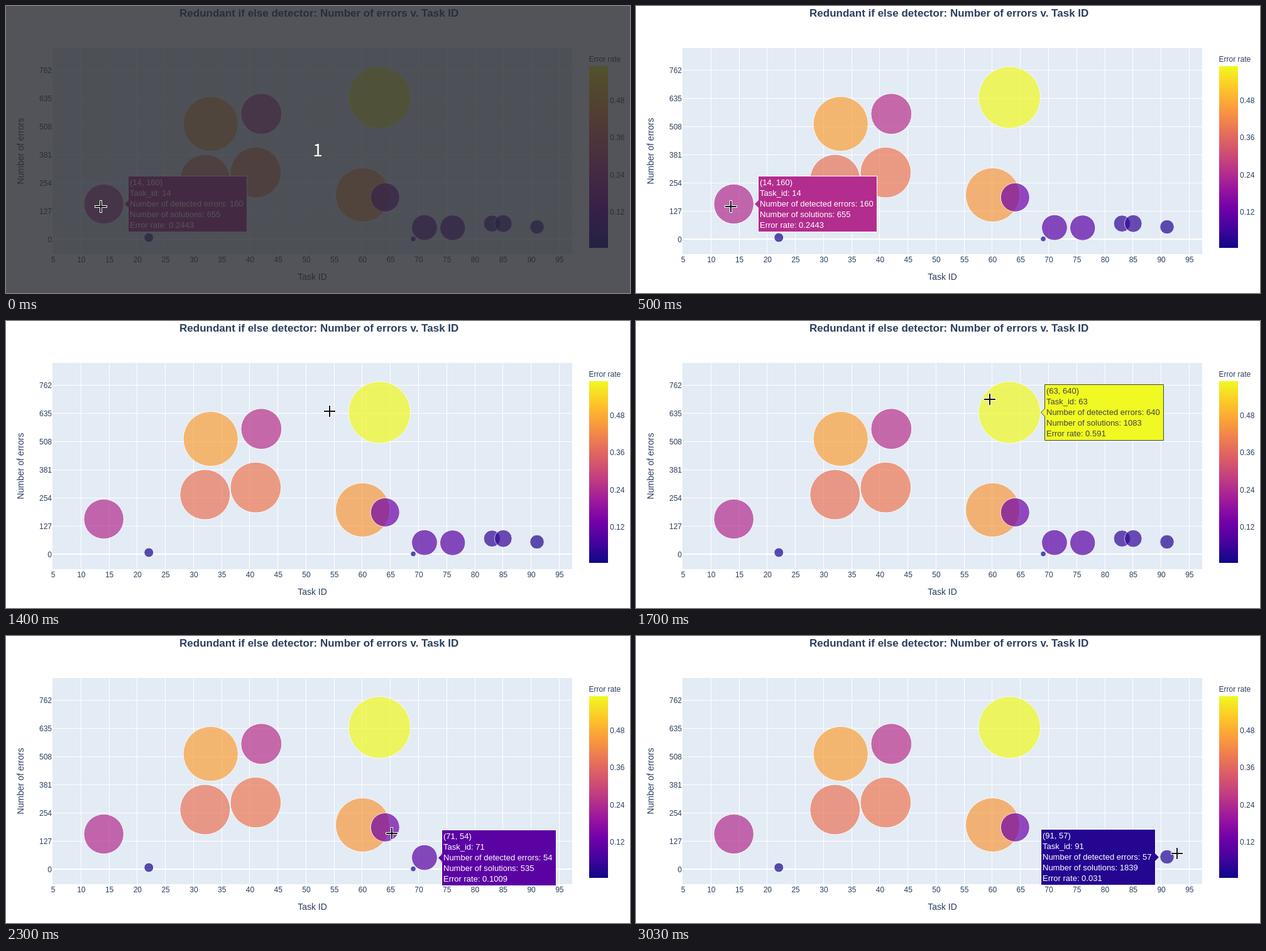
These frames come from a looping animation (993x458 px, 3.16 s). An HTML page:

```html
<!DOCTYPE html>
<html lang="en">
<head>
<meta charset="utf-8">
<title>Bubble chart</title>
<style>
  html, body { margin: 0; width: 100%; height: 100%; overflow: hidden; background: #fff; }
  svg { display: block; width: 100%; height: 100%; font: 12px "Liberation Sans", Arial, sans-serif; }
  text { white-space: pre; }
</style>
</head>
<body>
<svg id="stage" viewBox="0 0 993 458"></svg>
<script>
const LOOP = 3160, INK = '#2a3f5f';
const stage = document.getElementById('stage');

function add(parent, tag, attrs, content) {
  const el = document.createElementNS('http://www.w3.org/2000/svg', tag);
  for (const k in attrs) el.setAttribute(k, attrs[k]);
  if (content !== undefined) el.textContent = content;
  return parent.appendChild(el);
}
const label = (x, y, str, more) => add(stage, 'text', { x, y, fill: INK, ...more }, str);

// Scales
const px = id => 30.3 + 8.953 * id;
const py = n => 372.7 - n * 45 / 127;
const LOW = 0.0045, HIGH = 0.591;
const plasma = ['0d0887', '46039f', '7201a8', '9c179e', 'bd3786',
                'd8576b', 'ed7953', 'fb9f3a', 'fdca26', 'f0f921'];
const rgb = hex => [0, 2, 4].map(i => parseInt(hex.slice(i, i + 2), 16));

function colour(rate) {
  const p = Math.max(0, Math.min(1, (rate - LOW) / (HIGH - LOW))) * 9;
  const i = Math.min(8, Math.floor(p));
  const a = rgb(plasma[i]), b = rgb(plasma[i + 1]);
  return a.map((v, k) => Math.round(v + (b[k] - v) * (p - i)));
}

// Chart data: task id, errors, solutions. Place, size and colour follow from it.
const tasks = [
  [14, 160, 655], [22, 9, 660], [32, 270, 698], [33, 521, 1126], [41, 302, 765],
  [42, 566, 2220], [60, 201, 446], [63, 640, 1083], [64, 190, 1484], [69, 3, 667],
  [71, 54, 535], [76, 53, 535], [83, 72, 1674], [85, 72, 1532], [91, 57, 1839]
].map(([id, errors, total]) => {
  const rate = errors / total;
  return { id, errors, total, rate, x: px(id), y: py(errors), r: 64.3 * Math.sqrt(rate), fill: colour(rate) };
});

function drawChart() {
  label(498.2, 17, 'Redundant if else detector: Number of errors v. Task ID',
    { 'font-size': 17, 'font-weight': 'bold', 'text-anchor': 'middle' });
  add(stage, 'rect', { x: 74, y: 67, width: 827, height: 329, fill: '#e3ebf5' });

  for (let id = 5; id <= 95; id += 5) {
    if (id > 5) add(stage, 'path', { d: `M${Math.round(px(id)) - 0.5} 67V396`, stroke: '#fff' });
    label(px(id), 409, id, { 'text-anchor': 'middle' });
  }
  for (let n = 0; n <= 762; n += 127) {
    const y = Math.floor(py(n)) + (n ? 0.5 : 0);
    add(stage, 'path', { d: `M74 ${y}H901`, stroke: '#fff', 'stroke-width': n ? 1 : 2 });
    label(73, py(n) + 4.3, n, { 'text-anchor': 'end' });
  }
  label(487.5, 437, 'Task ID', { 'font-size': 14, 'text-anchor': 'middle' });
  label(0, 0, 'Number of errors',
    { 'font-size': 14, 'text-anchor': 'middle', transform: 'translate(28 231.5) rotate(-90)' });

  for (const t of tasks)
    add(stage, 'circle', { cx: t.x, cy: t.y, r: t.r, fill: `rgb(${t.fill})`, stroke: '#fff', opacity: 0.7 });

  const grad = add(stage, 'linearGradient', { id: 'scale', x1: 0, y1: 1, x2: 0, y2: 0 });
  plasma.forEach((c, i) => add(grad, 'stop', { offset: i / 9, 'stop-color': '#' + c }));
  add(stage, 'rect', { x: 928, y: 96, width: 30, height: 290, fill: 'url(#scale)' });
  label(927.5, 89, 'Error rate');
  for (let i = 1; i <= 4; i++) label(961, 392.3 - 59.3 * i, (i * 0.12).toFixed(2));
}

function makeTip(t) {
  const [r, g, b] = t.fill;
  const ink = r * 0.299 + g * 0.587 + b * 0.114 > 128 ? '#444' : '#fff';
  const tip = add(stage, 'g', { 'font-size': 13, fill: ink });
  const shape = add(tip, 'path', { fill: `rgb(${t.fill})`, stroke: ink });
  const lines = [
    `(${t.id}, ${t.errors})`,
    `Task_id: ${t.id}`,
    `Number of detected errors: ${t.errors}`,
    `Number of solutions: ${t.total}`,
    `Error rate: ${+t.rate.toFixed(4)}`
  ].map((s, i) => add(tip, 'text', { y: 17 * i - 30 }, s));
  const w = Math.round(Math.max(...lines.map(l => l.getComputedTextLength())) + 8.8);
  const flip = t.x + t.r + 6 + w > 993;
  const s = flip ? -1 : 1;
  const x = flip ? Math.ceil(t.x - t.r) - 1.5 : Math.floor(t.x + t.r) + 1.5;
  shape.setAttribute('d', `M0 0L${6 * s} 6V44.5h${w * s}V-44.5H${6 * s}V-6Z`);
  lines.forEach(l => l.setAttribute('x', flip ? -w - 3.5 : 8.5));
  tip.setAttribute('transform', `translate(${x} ${Math.round(t.y)})`);
  return tip;
}

drawChart();
const tips = tasks.map(makeTip);

const veil = add(stage, 'g', {});
add(veil, 'rect', { width: 993, height: 458, fill: '#282a30', 'fill-opacity': 0.8 });
add(veil, 'text', { x: 496, y: 240, fill: '#fff', 'font-size': 28, 'text-anchor': 'middle',
  'font-family': '"Noto Sans CJK JP", "Noto Sans CJK SC", sans-serif' }, '1');

const cursor = add(stage, 'g', {});
add(cursor, 'path', { d: 'M-10 0H10M0 -10V10', stroke: '#fff', 'stroke-width': 4 });
add(cursor, 'path', { d: 'M-9 0H9M0 -9V9', stroke: '#111', 'stroke-width': 2 });

// Turning points of the mouse: time, x, y
const path = [
  [467, 151, 320], [933, 330, 241], [1000, 330, 215], [1400, 515, 144], [1533, 561, 122],
  [1867, 566, 130], [2000, 557, 256], [2267, 614, 315], [2330, 652, 340], [2900, 849, 353], [3000, 861, 347]
];
const STEP = 200 / 3; // the screen refreshes 15 times a second
const LEAD = 60;      // the drawn cursor trails the mouse
const REACH = 8;      // hover distance outside a bubble

function mouse(t) {
  const i = path.findIndex(k => k[0] > t);
  if (i < 1) return path.at(i).slice(1);
  const [t0, x0, y0] = path[i - 1], [t1, x1, y1] = path[i];
  const f = (t - t0) / (t1 - t0);
  return [x0 + (x1 - x0) * f, y0 + (y1 - y0) * f];
}

// Nearest bubble edge; inside several bubbles the smallest wins
function hovered([x, y]) {
  const gaps = tasks.map(b => Math.max(Math.hypot(x - b.x, y - b.y) - b.r, 1 - 3 / b.r));
  const best = Math.min(...gaps);
  return best < REACH ? gaps.indexOf(best) : -1;
}

function render(t) {
  const now = Math.floor(t / STEP + 0.1) * STEP;
  const hit = hovered(mouse(now + LEAD));
  tips.forEach((tip, i) => tip.setAttribute('display', i === hit ? 'inline' : 'none'));
  veil.setAttribute('opacity', t < 30 ? 1 : t < 70 ? 0.5 : 0);
  cursor.setAttribute('transform', `translate(${mouse(now).map(Math.round)})`);
}

const begin = performance.now();
function tick() {
  render((performance.now() - begin) % LOOP);
  requestAnimationFrame(tick);
}
tick();
</script>
</body>
</html>
```
